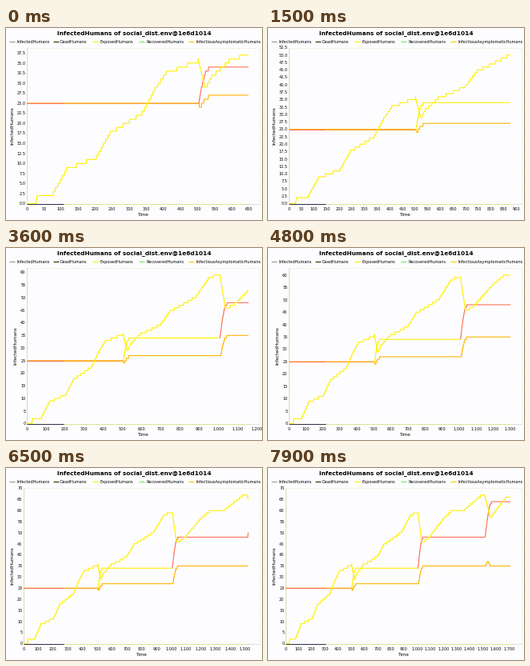
A matplotlib script for the animation above (8 s loop, 320 by 240 pixels).

```python
import numpy as np
import matplotlib.pyplot as plt
from matplotlib.animation import FuncAnimation

W, H, DPI = 320, 240, 80
FRAMES, INTERVAL = 80, 100
TOP, BOTTOM, RIGHT = 24.5, 219.5, 317
WARM_EDGE = 72  # colours are stronger left of this pixel

RED, AMBER, ORANGE, YELLOW = "#ff7058", "#ffa030", "#ffb400", "#fff000"
DARK, GREEN = "#30304a", "#70f060"
NAME = "InfectedHumans"

# simulated time reached at given milliseconds
CLOCK = [(0, 649), (1500, 878), (2300, 1000), (3600, 1156), (4800, 1300),
         (6500, 1522), (7900, 1709)]

# (time, count) where the exposed curve bends
BENDS = [(25, 0), (30, 2), (74, 2.5), (117, 9), (204, 12), (244, 18),
         (338, 23), (376, 29), (408, 33), (502, 36), (523, 29), (541, 32),
         (592, 36), (650, 37.9), (700, 40), (746, 45), (842, 49), (884, 51),
         (947, 58), (972, 59), (1008, 59), (1036, 46), (1085, 48),
         (1203, 57), (1258, 60), (1365, 61), (1482, 67), (1515, 67),
         (1557, 57), (1618, 62), (1671, 66)]

LEGEND = [
    (4, 14, NAME, "#a0a090"),
    (59, 68, "DeadHumans", "#404010"),
    (108, 118, "ExposedHumans", YELLOW),
    (166, 175, "RecoveredHumans", GREEN),
    (228, 237, "InfectiousAsymptomaticHumans", "#ffd000"),
]

T = np.arange(1710)


def part(start, span):
    return np.clip((T - start) / span, 0, 1)


def jump(start, span, size):
    """Fast rise that eases out."""
    return size * np.sin(np.pi / 2 * part(start, span))


def bump(start, span, size):
    return size * np.sin(np.pi * part(start, span))


def whole(values):
    return np.floor(values + 1e-6)


exposed = whole(np.interp(T, *zip(*BENDS)))
infected = whole(25 + jump(502, 30, 9) + jump(1006, 38, 14)
                 + jump(1517, 48, 16))
asymptomatic = whole(25 + bump(504, 8, -1) + jump(512, 20, 2)
                     + jump(1010, 32, 8) + bump(1517, 43, 2.2))
peaks = np.maximum.accumulate(np.maximum(exposed, infected))

fig = plt.figure(figsize=(W / DPI, H / DPI), dpi=DPI, facecolor="#fdfdff")
ax = fig.add_axes([0, 0, 1, 1])


def px(size):
    return size * 72 / DPI


def label(x, y, text, size, ha="center", **kw):
    """Text whose capitals are centred on y."""
    ax.text(x, y + 0.365 * size, text, fontsize=px(size), ha=ha,
            va="baseline", color="black", family="DejaVu Sans", **kw)


def line(x, y, color, width=1.1, **kw):
    ax.plot(x, y, color=color, lw=px(width), solid_capstyle="butt", **kw)


def layout(peak):
    """Tick step, axis position and axis title position."""
    if peak < 55:
        return 2.5, 26, 8
    if peak < 64:
        return 5, 26, 12
    return 5, 22, 8


def draw(frame):
    ax.cla()
    ax.set(xlim=(0, W), ylim=(H, 0))
    ax.axis("off")

    now = np.interp(frame * INTERVAL, *zip(*CLOCK))
    peak = peaks[int(now)]
    x_max, y_max = now * 1.05, peak * 1.05
    x_step = 50 if x_max < 1000 else 100
    y_step, left, name_x = layout(peak)

    def sx(t):
        return left + (RIGHT - left) * t / x_max

    def sy(v):
        return BOTTOM - (BOTTOM - TOP) * v / y_max

    def trace(values, color, start=0, end=np.inf):
        shown = (T >= start) & (T <= min(end, now))
        line(sx(T[shown]), sy(values[shown]), color)

    # frame and axes
    line([left, RIGHT, RIGHT], [TOP, TOP, BOTTOM], "#e8e8c8", 0.8,
         dashes=(3, 2))
    line([left, left], [TOP, BOTTOM], "#d8d8b0", 0.9)
    line([left, RIGHT], [BOTTOM, BOTTOM], "#dcdcdc", 0.9)
    for t in np.arange(0, x_max, x_step):
        label(sx(t), 225.8, f"{t:,.0f}", 5)
    for v in np.arange(0, y_max + 1e-6, y_step):
        text = f"{v:.1f}" if y_step == 2.5 else f"{v:.0f}"
        label(left - 1.5, sy(v), text, 5, ha="right")
    label((left + RIGHT) / 2, 233, "Time", 5.6)
    ax.text(name_x, 122, NAME, fontsize=px(5.8), rotation=90, ha="center",
            va="center", color="black", family="DejaVu Sans")

    # data
    edge = (WARM_EDGE - left) / (RIGHT - left) * x_max
    line([left, sx(now)], [BOTTOM, BOTTOM], "#e0e090", 1)
    line([left, WARM_EDGE], [BOTTOM, BOTTOM], DARK, 1)
    trace(asymptomatic, ORANGE)
    trace(infected, RED, 0, edge)
    trace(infected, AMBER, edge, 502)
    trace(infected, RED if now < 780 else YELLOW, 502, 1006)
    trace(infected, RED, 1006)
    trace(exposed, YELLOW)

    # heading and legend
    label(160, 5.8, NAME + " of social_dist.env@1e6d1014", 7.35,
          weight="bold")
    for x, text_x, text, color in LEGEND:
        line([x, x + 7], [17.2, 17.2], color, 1.3)
        label(text_x, 17.2, text, 5, ha="left")
    return []


anim = FuncAnimation(fig, draw, frames=FRAMES, interval=INTERVAL,
                     init_func=lambda: [], repeat=True, repeat_delay=0)
plt.show()
```
